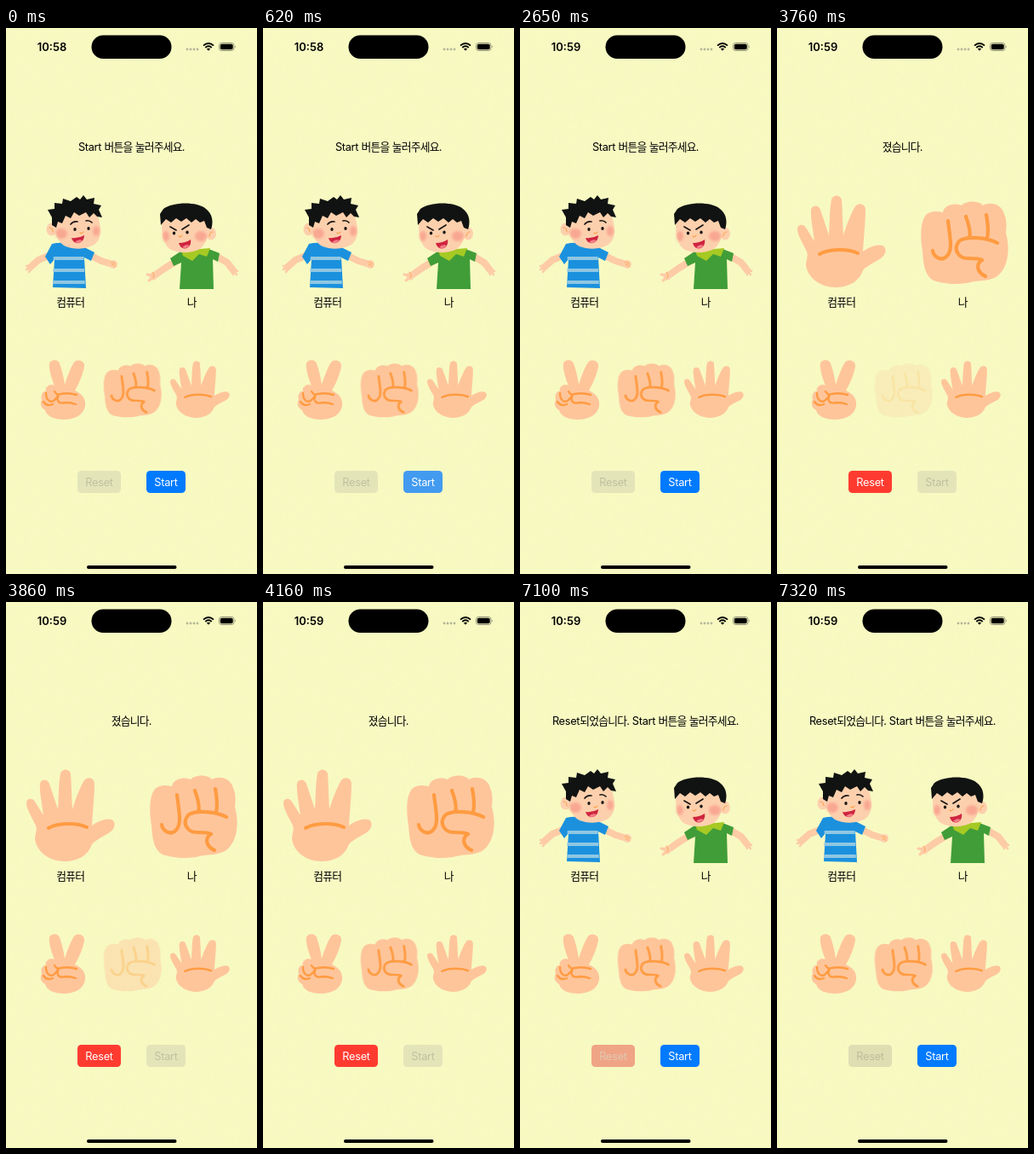
An HTML page that plays this animation: 295x640 px, repeating every 8000 ms.

```html
<!DOCTYPE html>
<html lang="ko">
<head>
<meta charset="utf-8">
<title>가위바위보</title>
<style>
html, body { margin: 0; width: 100%; height: 100%; overflow: hidden; background: #f8fac2; }
svg { display: block; width: 100vw; height: 100vh; }
text { font: 12.77px Inter, "Noto Sans CJK KR", "Noto Sans CJK", sans-serif; letter-spacing: -.3px; text-anchor: middle; }
.ko { letter-spacing: -.75px; }
.clock { font-weight: 600; font-size: 13px; letter-spacing: 0; }
.skin { fill: #fec59b; }
.crease { fill: none; stroke: #ff9b41; stroke-linecap: round; stroke-linejoin: round; }
.arm { fill: none; stroke: #fdcba5; stroke-linecap: round; stroke-linejoin: round; }
.face { fill: #fdd0ad; }
.hair { fill: #111312; }
.cheek { fill: #f79a88; opacity: .75; filter: url(#soft); }
.brow { fill: none; stroke: #1b1715; stroke-width: 1.7; stroke-linecap: round; }
.mouth { fill: #cf2440; }

.clock, .idle, .first, .result, .again, .tap, .reset, .reset-label, .start, .start-label {
  animation: 8s step-end infinite;
}
.before { animation-name: before; }
.after { animation-name: after; }
.idle { animation-name: idle; }
.first { animation-name: first; }
.result { animation-name: result; }
.again { animation-name: again; }
.tap { animation-name: tap; }
.reset { animation-name: reset; }
.reset-label { animation-name: reset-label; }
.start { animation-name: start; }
.start-label { animation-name: start-label; }

@keyframes before { 0% { visibility: visible } 33.125%, 100% { visibility: hidden } }
@keyframes after { 0% { visibility: hidden } 33.125%, 100% { visibility: visible } }
@keyframes idle { 0%, 88.75%, 100% { visibility: visible } 47% { visibility: hidden } }
@keyframes first { 0% { visibility: visible } 47%, 100% { visibility: hidden } }
@keyframes result { 0%, 88.75%, 100% { visibility: hidden } 47% { visibility: visible } }
@keyframes again { 0% { visibility: hidden } 88.75%, 100% { visibility: visible } }
@keyframes tap {
  0%, 52%, 100% { opacity: 1 }
  47% { opacity: .22 } 48.25% { opacity: .42 } 49.5% { opacity: .66 } 50.75% { opacity: .88 }
}
@keyframes reset {
  0% { fill: #e3e5b9 } 47% { fill: #ff3b30 } 87.5% { fill: #ff6a55 }
  88.75% { fill: #f0a486 } 90.125% { fill: #e5cda5 } 91.5%, 100% { fill: #dfdeb3 }
}
@keyframes reset-label {
  0% { fill: #bfc19f } 47% { fill: #fff } 87.5% { fill: #ffd9cd }
  88.75% { fill: #dfc9b0 } 90.125% { fill: #c8c2a3 } 91.5%, 100% { fill: #bdbd9b }
}
@keyframes start {
  0%, 11.5%, 88.75%, 100% { fill: #007aff }
  6.25% { fill: #439bf0 } 8.75% { fill: #2c90f5 } 10.25% { fill: #1484fa }
  47% { fill: #e3e5b9 }
}
@keyframes start-label { 0%, 88.75%, 100% { fill: #fff } 47% { fill: #bfc19f } }
</style>
</head>
<body>
<svg viewBox="0 0 295 640" preserveAspectRatio="none">
  <defs>
    <filter id="soft" x="-50%" y="-50%" width="200%" height="200%"><feGaussianBlur stdDeviation="1.6"/></filter>
    <filter id="grain" x="0" y="0" width="100%" height="100%">
      <feTurbulence type="fractalNoise" baseFrequency=".22" numOctaves="2" seed="4"/>
      <feColorMatrix values="0 0 0 0 .85  0 0 0 0 .87  0 0 0 0 .5  .22 0 0 0 -.04"/>
    </filter>
    <clipPath id="torso"><path d="M56 254H91L93 305H55Z"/></clipPath>

    <g id="paper">
      <path class="skin" d="M35 262C30 252 24 242 24 236C24 230 31 229 34 234L44 250C42 236 39 220 40 213C41 207 49 207 51 213L61 243C62 228 62 210 64 201C66 195 74 195 76 201C77 215 77 228 78 243C82 230 88 215 92 209C96 204 104 206 104 213C104 228 102 245 101 262C108 257 118 253 124 255C130 258 128 266 122 270C112 276 104 280 101 284C97 297 84 304 69 304C50 304 36 292 34 278C34 272 37 268 35 262Z"/>
      <path class="crease" stroke-width="4" d="M50 265C60 259 83 258 95 264"/>
    </g>
    <g id="rock">
      <path class="skin" d="M171 262C168 245 168 222 178 217C186 213 193 216 195 216C196 208 208 204 217 208C222 202 238 202 242 208C250 203 264 206 267 218C270 224 270 232 269 240C274 258 272 278 262 288C254 297 240 296 232 297C215 302 195 300 184 296C173 290 172 275 171 262Z"/>
      <path class="crease" stroke-width="4.2" d="M201 226C203 245 208 262 198 269C192 273 184 268 183 261M222 221C226 232 228 240 226 246M246 219C248 230 249 238 247 246M259 252C248 246 222 243 214 250C206 260 214 270 224 270C232 270 238 270 241 272C234 276 234 286 245 291"/>
    </g>
  </defs>

  <rect width="295" height="640" fill="#f8fac2"/>
  <rect width="295" height="640" filter="url(#grain)"/>

  <!-- status bar -->
  <text class="clock before" x="54" y="27">10:58</text>
  <text class="clock after" x="54" y="27">10:59</text>
  <rect x="100.5" y="8.5" width="94" height="27.5" rx="13.75"/>
  <g fill="#b5b79a">
    <circle cx="213" cy="25" r="1.4"/><circle cx="217" cy="25" r="1.4"/>
    <circle cx="221" cy="25" r="1.4"/><circle cx="225" cy="25" r="1.4"/>
  </g>
  <g fill="none" stroke="#000" stroke-width="1.9">
    <path d="M232 20.6Q238 15.3 244 20.6M234.3 23Q238 19.7 241.7 23"/>
  </g>
  <path d="M235.9 24.6Q238 22.9 240.1 24.6L238 26.8Z"/>
  <rect x="250.5" y="17.5" width="17.5" height="9" rx="2.8" fill="none" stroke="#8b8c72" stroke-width=".9"/>
  <rect x="251.8" y="18.8" width="14.9" height="6.4" rx="1.7"/>
  <path d="M269 20.3Q270.6 22 269 23.7Z" fill="#8b8c72"/>

  <!-- messages -->
  <text class="first" x="147.5" y="144">Start <tspan class="ko">버튼을</tspan> <tspan class="ko">눌러주세요</tspan>.</text>
  <text class="result" x="147.5" y="144"><tspan class="ko">졌습니다</tspan>.</text>
  <text class="again" x="147.5" y="144">Reset<tspan class="ko">되었습니다</tspan>. Start <tspan class="ko">버튼을</tspan> <tspan class="ko">눌러주세요</tspan>.</text>
  <text class="ko" x="75.7" y="326">컴퓨터</text>
  <text class="ko" x="218.3" y="326">나</text>

  <!-- players -->
  <g class="idle">
    <path class="arm" stroke-width="8" d="M50 267L38 272L29 280"/>
    <path class="arm" stroke-width="2.6" d="M29 279L24 279M28 281L24 283M30 282L27 286"/>
    <path class="arm" stroke-width="8" d="M98 266L112 273L122 276"/>
    <circle class="face" cx="126" cy="277" r="5"/>
    <path class="crease" stroke-width=".9" d="M123 275Q127 274 129 277M124 278Q127 276 128 280"/>
    <path fill="#1b91de" d="M54 253C66 250 80 253 92 257L104 263L100 273L92 269L94 305L55 304L57 271L52 277L46 268Z"/>
    <g clip-path="url(#torso)" fill="#8fc7e2">
      <rect x="50" y="268" width="50" height="4"/>
      <rect x="50" y="282" width="50" height="4"/>
      <rect x="50" y="296" width="50" height="4"/>
    </g>
    <ellipse class="face" cx="53.5" cy="236" rx="6" ry="7.5"/>
    <path class="crease" stroke-width="1" d="M51 234Q55 234 55 239"/>
    <path class="face" d="M59 222C64 210 104 208 107 219C112 230 113 245 106 252C98 260 80 260 70 256C61 252 57 240 59 230Z"/>
    <ellipse class="cheek" cx="65" cy="241" rx="7" ry="6"/>
    <ellipse class="cheek" cx="106" cy="238" rx="4" ry="6"/>
    <path class="hair" d="M54 231L54 222L49 213L57 212L57 205L66 206L67 200L76 203L83 198L87 201L91 196L95 201L104 199L103 206L112 208L109 213L113 222L107 221L103 217L98 222L94 216L86 220L80 216L76 223L70 220L66 229L61 227L59 234Z"/>
    <path class="brow" d="M76 230Q79 226 84 227M94 226Q98 225 101 228"/>
    <ellipse cx="81" cy="236" rx="1.7" ry="2.1" fill="#1b1715"/>
    <ellipse cx="97" cy="235" rx="1.7" ry="2.1" fill="#1b1715"/>
    <path class="crease" stroke-width="1.1" d="M87 240Q89 242 91 239"/>
    <path class="mouth" d="M77 246Q85 247 92 243C92 253 80 256 77 246Z"/>
    <path fill="#f37d86" d="M81 251Q85 247 90 249Q86 254 81 251Z"/>
  </g>
  <g class="idle">
    <path class="arm" stroke-width="8" d="M199 274L186 282L176 289"/>
    <circle class="face" cx="173" cy="291" r="4.6"/>
    <path class="arm" stroke-width="3" d="M172 290L166 289M173 292L168 296"/>
    <path class="crease" stroke-width=".9" d="M172 286Q176 290 173 293"/>
    <path class="arm" stroke-width="8" d="M248 268L260 275L267 284"/>
    <path class="arm" stroke-width="2.6" d="M267 284L271 289M266 285L267 289M268 283L272 285"/>
    <path fill="#419d38" d="M205 262L238 259L251 264L249 274L243 271L244 306L204 306L206 275L197 279L193 270Z"/>
    <path fill="#a6c923" d="M206 261L240 258L236 268L227 265L219 273L208 267Z"/>
    <ellipse class="face" cx="241" cy="241" rx="6" ry="7.5"/>
    <path class="crease" stroke-width="1" d="M243 239Q239 239 239 244"/>
    <path class="face" d="M184 222C190 211 230 211 236 224C241 238 236 255 226 260C215 265 197 264 190 257C183 249 182 234 184 222Z"/>
    <ellipse class="cheek" cx="188" cy="244" rx="4" ry="6"/>
    <ellipse class="cheek" cx="229" cy="244" rx="7" ry="6"/>
    <path class="hair" d="M182 231L181 218L185 212C196 204 224 203 235 212C243 218 244 228 241 236L236 234L233 226L228 228L223 224L218 228L212 223L206 227L200 223L194 228L188 224Z"/>
    <path class="brow" d="M193 233L200 237M207 236L215 231"/>
    <ellipse cx="197.5" cy="240.5" rx="1.7" ry="2.1" fill="#1b1715"/>
    <ellipse cx="213" cy="239.5" rx="1.7" ry="2.1" fill="#1b1715"/>
    <path class="crease" stroke-width="1.1" d="M203 244Q205 246 207 243"/>
    <path class="mouth" d="M203 252Q211 252 217 248C219 259 206 263 203 252Z"/>
    <path fill="#f37d86" d="M207 257Q211 253 216 255Q212 260 207 257Z"/>
  </g>

  <!-- round result -->
  <use class="result" href="#paper"/>
  <use class="result" href="#rock"/>

  <!-- choices -->
  <path class="skin" d="M49 420C52 417 57 419 57 419C53 410 50 398 51 393C53 388 61 388 63 393C66 402 68 410 69 418C72 408 77 396 80 392C84 387 93 390 92 397C90 408 84 420 81 425C90 429 94 435 93 443C91 454 80 459 68 459C56 459 48 455 46 448C42 446 39 441 42 436C40 430 44 425 47 426C46 424 47 421 49 420Z"/>
  <path class="crease" stroke-width="2.4" d="M57 426Q60 431 64 429Q74 427 83 430M62 430C58 438 63 441 70 439Q77 439 82 441M47 428C47 437 53 440 57 436Q61 433 61 430M44 438Q48 444 55 441"/>
  <g class="tap"><use href="#rock" transform="translate(114 393) scale(.663 .653) translate(-168 -203)"/></g>
  <use href="#paper" transform="translate(193 390) scale(.673 .62) translate(-24 -196)"/>

  <!-- buttons -->
  <rect class="reset" x="84" y="519" width="51" height="26" rx="4.6"/>
  <text class="reset-label" x="109.5" y="536.6">Reset</text>
  <rect class="start" x="165" y="519" width="46" height="26" rx="4.6"/>
  <text class="start-label" x="188" y="536.6">Start</text>

  <rect x="95" y="630" width="105.5" height="4" rx="2"/>
</svg>
</body>
</html>
```
